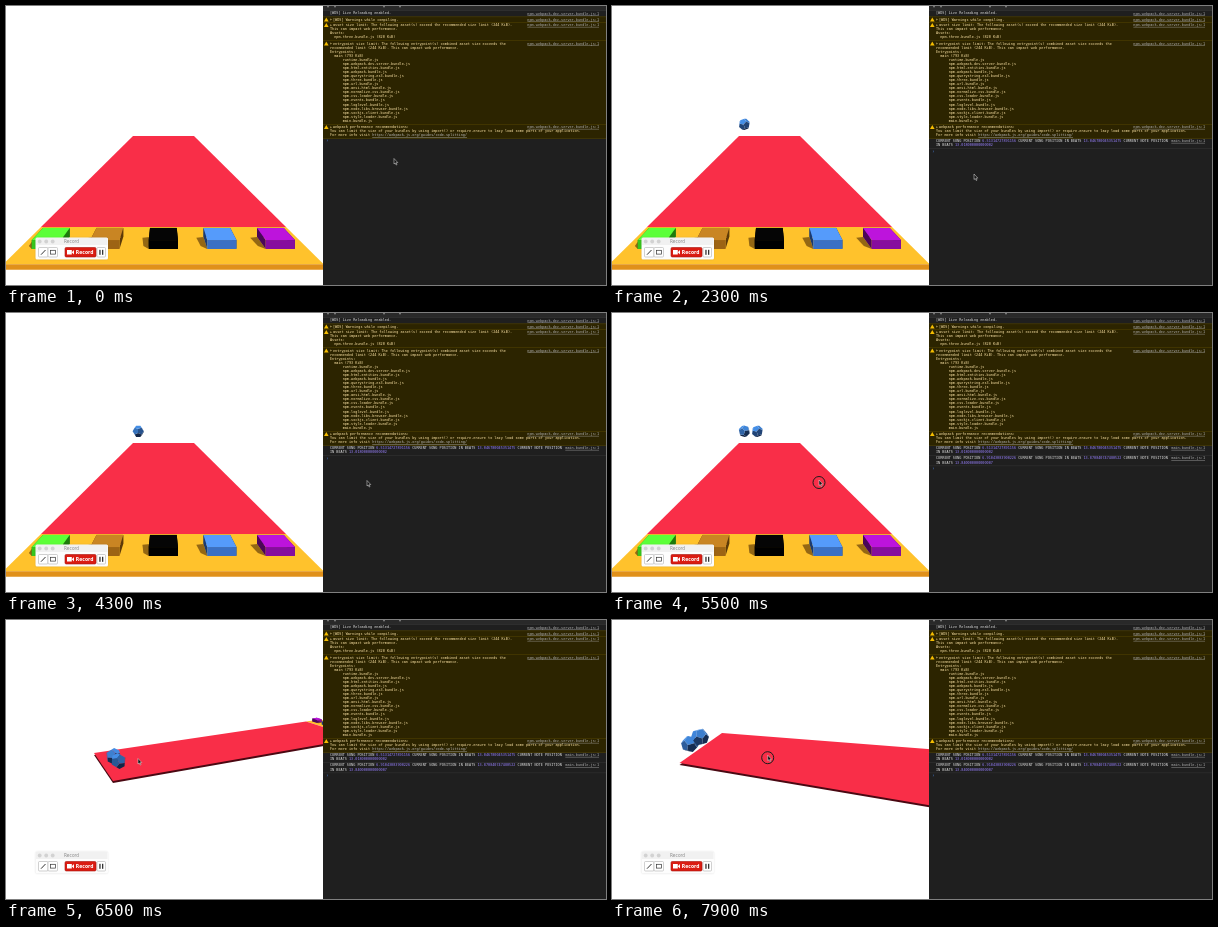
An HTML page with a canvas that plays this animation: 600 px wide and 279 px high, repeating every 8000 ms.

```html
<!DOCTYPE html>
<html lang="en">
<head>
<meta charset="utf-8">
<title>Note highway</title>
<style>
html, body { margin: 0; width: 100%; height: 100%; overflow: hidden; background: #fff; }
canvas { display: block; width: 100vw; height: 100vh; }
</style>
</head>
<body>
<canvas width="600" height="279"></canvas>
<script>
const ctx = document.querySelector('canvas').getContext('2d');
const LOOP = 8000, STEP = 100, SPLIT = 317;
const MONO = '"DejaVu Sans Mono", monospace', SANS = '"DejaVu Sans", sans-serif';
const LINK = '#b0b0b0', PALE = '#ffe6a6', PLAIN = '#e0e0e0', NUMBER = '#9880ff';

// Road corners (far left, far right, near right, near left), two notes, note radius, block height
const front = [127,130, 188,130, 280,221, 35,221, 132.3,118.3, 145.3,118.3, 6, 9];
const left = [100,129, 157,123, 370,191, 430,281, 108,116.5, 121,115, 6.3, 9];
const end = [107,161, 88,133, 300,101.5, 352,118, 107.5,136, 112.5,141, 8, 3];
const side = [67.5,143, 110,113, 380,134, 375,195, 78,124, 88,117, 9, 5];
const poses = [[0, front], [5500, front], [5900, left], [6400, end], [6600, end], [7900, side]];
const pointer = [[0, [388, 155]], [800, [388, 155]], [1000, [384, 158]], [1400, [384, 158]],
  [2300, [362, 170.5]], [4300, [361, 170]], [4700, [290, 198]], [5100, [208, 170]], [5500, [207, 169.5]],
  [5900, [237, 175]], [6500, [132, 141]], [7000, [130, 140]], [7900, [155.7, 137.7]]];
const presses = [[5200, 6200], [7100, 8000]];
const logTimes = [1500, 4700];

function sample(keys, t) {
  const next = keys.findIndex(key => key[0] > t);
  if (next < 0) return keys[keys.length - 1][1];
  const [t0, a] = keys[next - 1], [t1, b] = keys[next];
  return a.map((v, i) => v + (b[i] - v) * (t - t0) / (t1 - t0));
}

function rect(x, y, w, h, fill) {
  ctx.fillStyle = fill;
  ctx.fillRect(x, y, w, h);
}

function poly(points, fill) {
  ctx.beginPath();
  points.forEach(p => ctx.lineTo(p[0], p[1]));
  ctx.closePath();
  ctx.fillStyle = fill;
  ctx.fill();
}

function disc(x, y, r, fill) {
  ctx.beginPath();
  ctx.arc(x, y, r, 0, 7);
  ctx.fillStyle = fill;
  ctx.fill();
}

function roundBox(x, y, w, h, r, fill, stroke) {
  ctx.beginPath();
  ctx.roundRect(x, y, w, h, r);
  ctx.fillStyle = fill;
  ctx.fill();
  if (!stroke) return;
  ctx.strokeStyle = stroke;
  ctx.lineWidth = .6;
  ctx.stroke();
}

// Laid out large and scaled down, so that tiny text keeps its true advance widths
function text(str, x, y, color, { size = 3.5, font = MONO, weight = '', align = 'left', underline = false } = {}) {
  const zoom = 20;
  ctx.save();
  ctx.translate(x, y);
  ctx.scale(1 / zoom, 1 / zoom);
  ctx.font = `${weight} ${size * zoom}px ${font}`;
  ctx.textAlign = align;
  ctx.textBaseline = 'middle';
  ctx.fillStyle = color;
  ctx.fillText(str, 0, 0);
  const width = ctx.measureText(str).width;
  if (underline) ctx.fillRect(align === 'right' ? -width : 0, 1.7 * zoom, width, .4 * zoom);
  ctx.restore();
  return width / zoom;
}

// Projective map of the unit square onto the road; w above 1 runs on to the platform
function roadMap([ax, ay, bx, by, cx, cy, dx, dy]) {
  const x1 = bx - cx, y1 = by - cy, x2 = dx - cx, y2 = dy - cy;
  const sx = ax - bx + cx - dx, sy = ay - by + cy - dy, det = x1 * y2 - x2 * y1;
  const g = (sx * y2 - sy * x2) / det, h = (x1 * sy - y1 * sx) / det;
  return (u, w) => {
    const k = 1 + g * u + h * w;
    return [((bx - ax + g * bx) * u + (dx - ax + h * dx) * w + ax) / k,
            ((by - ay + g * by) * u + (dy - ay + h * dy) * w + ay) / k];
  };
}

const raise = (points, dy) => points.map(([x, y]) => [x, y - dy]);

function block(map, u, lift, top, face, dark) {
  const base = [map(u, 1.025), map(u + .101, 1.025), map(u + .101, 1.051), map(u, 1.051)];
  const lid = raise(base, lift);
  const wall = (i, j, fill) => poly([base[i], base[j], lid[j], lid[i]], fill);
  poly([map(u - .028, 1.027), base[0], base[3], map(u - .02, 1.045)], 'rgba(60,30,0,.55)');
  wall(0, 1, dark);
  wall(0, 3, dark);
  wall(1, 2, dark);
  wall(2, 3, face);
  poly(lid, top);
}

const blockColors = [
  ['#5cff38', '#37c41c', '#1c7a0c'], ['#c98523', '#9d6414', '#5e3a08'], ['#050505', '#000', '#000'],
  ['#559bfb', '#3a70c4', '#1b3a70'], ['#bd14dc', '#860d9e', '#4a0758']];

function drawRoad(pose) {
  const map = roadMap(pose), lift = pose[13];
  const road = [map(0, 0), map(1, 0), map(1, 1), map(0, 1)];
  const deck = [map(0, 1), map(1, 1), map(1, 1.078), map(0, 1.078)];
  const rim = deck.slice(2);
  poly(raise(road, -2), '#4a0812');
  poly(deck, '#ffc22c');
  poly([...rim, ...raise(rim, -lift * .6).reverse()], '#e0901a');
  poly(road, '#f92e48');
  blockColors.forEach((colors, i) => block(map, .045 + .202 * i, lift, ...colors));
}

// Dodecahedron: vertices and face normals are cyclic shifts of short patterns
const PHI = (1 + Math.sqrt(5)) / 2, signs = [-1, 1];
const cycles = (a, b, c) => [[a, b, c], [c, a, b], [b, c, a]];
const vertices = signs.flatMap(i => signs.flatMap(j => [
  ...signs.map(k => [i, j, k]), ...cycles(0, i / PHI, j * PHI)]));
const normals = signs.flatMap(i => signs.flatMap(j => cycles(i, 0, j * PHI)));
const dot = (a, b) => a[0] * b[0] + a[1] * b[1] + a[2] * b[2];

function drawNote(x, y, r, angle) {
  const c = Math.cos(angle), s = Math.sin(angle);
  const turn = ([px, py, pz]) => {
    const qx = px * c + pz * s, qz = pz * c - px * s;
    return [qx, py * c - qz * s, py * s + qz * c];
  };
  const scale = r / Math.sqrt(3);
  for (const normal of normals) {
    const n = turn(normal);
    if (n[2] <= 0) continue;
    const corners = vertices.filter(v => dot(v, normal) > 2.6).map(turn);
    const mx = corners.reduce((sum, p) => sum + p[0], 0) / 5;
    const my = corners.reduce((sum, p) => sum + p[1], 0) / 5;
    corners.sort((p, q) => Math.atan2(p[1] - my, p[0] - mx) - Math.atan2(q[1] - my, q[0] - mx));
    const light = Math.max(0, Math.min(1, .45 + dot(n, [-.15, -.4, .05])));
    poly(corners.map(p => [x + p[0] * scale, y + p[1] * scale]),
      `rgb(${18 + 50 * light},${38 + 104 * light},${72 + 158 * light})`);
  }
}

function drawRecorder() {
  ctx.save();
  ctx.shadowColor = 'rgba(0,0,0,.15)';
  ctx.shadowBlur = 1.5;
  roundBox(29.5, 231.5, 72.5, 22, 1.5, '#fdfdfd');
  ctx.restore();
  rect(30, 232, 71.5, 7, '#f1f1f1');
  [33.7, 40.2, 46.7].forEach(x => disc(x, 235.5, 1.9, '#d2d2d2'));
  text('Record', 65.5, 235.8, '#8a8a8a', { size: 4.3, font: SANS, align: 'center' });
  roundBox(32.5, 241.5, 9.5, 9.5, 1, '#fff', '#b0b0b0');
  roundBox(42, 241.5, 9.5, 9.5, 1, '#fff', '#b0b0b0');
  roundBox(91, 241.5, 8.5, 9.5, 1, '#fff', '#b0b0b0');
  roundBox(59, 241.5, 31, 9.5, 1.2, '#da1c12', '#a8140c');
  ctx.strokeStyle = '#333';
  ctx.lineWidth = 1;
  ctx.beginPath();
  ctx.moveTo(35, 248.7);
  ctx.lineTo(39.5, 244);
  ctx.stroke();
  ctx.lineWidth = .7;
  ctx.strokeRect(44.5, 244.3, 5, 3.8);
  rect(93.3, 243.8, 1.3, 5, '#333');
  rect(96, 243.8, 1.3, 5, '#333');
  rect(61, 244, 4.8, 4.5, '#fff');
  poly([[65.8, 246.2], [68, 244], [68, 248.5]], '#fff');
  text('Record', 69.7, 246.4, '#fff', { size: 4.5, font: SANS, weight: 'bold' });
}

const link = (str, y) => text(str, 593, y, LINK, { align: 'right', underline: true });

function warning(y, lines, step = 4.07) {
  poly([[320.3, y - 2.2], [322.6, y + 1.8], [318, y + 1.8]], '#f5bd00');
  poly([[324.3, y - 1], [325.9, y], [324.3, y + 1]], '#b9a56a');
  lines.forEach((line, i) => text(line, i ? 324 : 327, y + i * step, PALE));
  link('npm.webpack-dev-server.bundle.js:1', y);
}

const bundles = ['runtime', ...['webpack-dev-server', 'html-entities', 'webpack', 'querystring-es3', 'three', 'url',
  'ansi-html', 'normalize.css', 'css-loader', 'events', 'loglevel', 'node-libs-browser', 'sockjs-client',
  'style-loader'].map(name => 'npm.' + name), 'main'].map(name => `      ${name}.bundle.js`);

const logs = [
  ['6.51314727891156', '13.046780045351475', '13.018000000000002'],
  ['6.91043083900226', '13.870840747480522', '13.840000000000007']];

function logEntry(y, [song, beats, note]) {
  let x = 324;
  const add = (str, color) => { x += text(str, x, y, color); };
  add('CURRENT SONG POSITION ', PLAIN);
  add(song, NUMBER);
  add(' CURRENT SONG POSITION IN BEATS ', PLAIN);
  add(beats, NUMBER);
  add(' CURRENT NOTE POSITION', PLAIN);
  link('main.bundle.js:1', y);
  x = 324;
  y += 4.3;
  add('IN BEATS ', PLAIN);
  add(note, NUMBER);
  rect(SPLIT, y + 2.8, 283, .5, '#343434');
}

function drawConsole(t) {
  rect(SPLIT, 0, 283, 279, '#1f1f1f');
  rect(SPLIT, 0, 283, 4, '#292929');
  rect(SPLIT, 4, 283, .6, '#3a3a3a');
  [321, 328, 377, 393].forEach(x => rect(x, 0, 2, 1.3, '#777'));
  text('[WDS] Live Reloading enabled.', 324, 7.5, PLAIN);
  link('npm.webpack-dev-server.bundle.js:1', 7.7);
  rect(SPLIT, 10.6, 283, 122, '#2c2400');
  [10.6, 16.2, 34.2, 118, 132.4].forEach(y => rect(SPLIT, y, 283, .5, '#544500'));
  warning(13.6, ['[WDS] Warnings while compiling.']);
  warning(19.2, ['asset size limit: The following asset(s) exceed the recommended size limit (244 KiB).',
    'This can impact web performance.', 'Assets:', '  npm.three.bundle.js (820 KiB)']);
  warning(37.6, ['entrypoint size limit: The following entrypoint(s) combined asset size exceeds the',
    'recommended limit (244 KiB). This can impact web performance.', 'Entrypoints:', '  main (793 KiB)', ...bundles]);
  warning(121.2, ['webpack performance recommendations:',
    'You can limit the size of your bundles by using import() or require.ensure to lazy load some parts of your application.',
    'For more info visit '], 4.15);
  text('https://webpack.js.org/guides/code-splitting/', 366.2, 129.5, '#b8b8b8', { underline: true });
  const shown = logTimes.filter(start => t >= start).length;
  logs.slice(0, shown).forEach((entry, i) => logEntry(135.2 + 10.3 * i, entry));
  text('›', 320, 135 + 10.4 * shown, '#4a80d8', { size: 4.5 });
}

function drawPointer(t) {
  const [x, y] = sample(pointer, t);
  if (presses.some(([from, to]) => t >= from && t < to)) {
    ctx.beginPath();
    ctx.arc(x, y, 6, 0, 7);
    ctx.strokeStyle = '#1c1c1c';
    ctx.lineWidth = 1;
    ctx.stroke();
  }
  const arrow = [[0, -2.5], [0, 3], [1.2, 2], [2.2, 4], [3, 3.6], [2.1, 1.7], [3.8, 1.6]]
    .map(([px, py]) => [x + px, y + py]);
  poly(arrow, '#111');
  ctx.strokeStyle = '#e8e8e8';
  ctx.lineWidth = .5;
  ctx.stroke();
}

function draw(now) {
  const t = Math.floor(now % LOOP / STEP) * STEP;
  const pose = sample(poses, t);
  rect(0, 0, 600, 279, '#fff');
  drawRoad(pose);
  logTimes.forEach((start, i) => {
    if (t >= start) drawNote(pose[8 + 2 * i], pose[9 + 2 * i], pose[12], (t - start) / 1000 + .4);
  });
  drawRecorder();
  drawConsole(t);
  drawPointer(t);
  requestAnimationFrame(() => draw(performance.now()));
}
draw(0);
</script>
</body>
</html>
```
